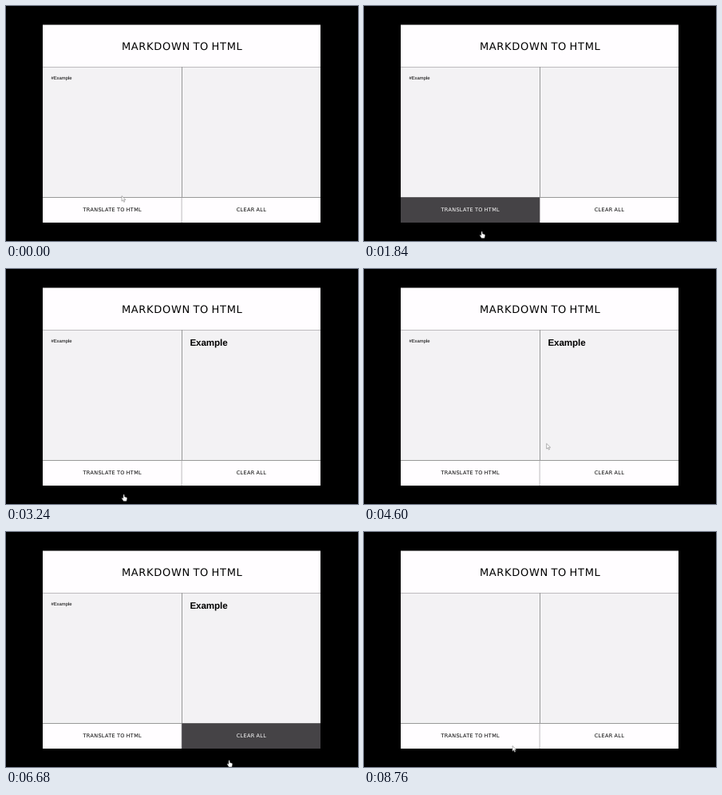
Animation of 441x294 px, one loop 9.44 s. Source, as an HTML page:

```html
<!DOCTYPE html>
<html lang="en">
<head>
<meta charset="utf-8">
<title>Markdown to HTML</title>
<style>
  html, body { margin: 0; width: 100%; height: 100%; overflow: hidden; background: #000; }
  svg { display: block; width: 441px; height: 294px; text-rendering: geometricPrecision; }
  .wide { font-family: "DejaVu Sans", sans-serif; text-anchor: middle; }
  .title { font-size: 13px; letter-spacing: .68px; word-spacing: -1.2px; }
  .label { font-size: 6.5px; letter-spacing: .34px; word-spacing: -.5px; }
  .plain { font-family: "Liberation Sans", Arial, sans-serif; }
</style>
</head>
<body>
<svg viewBox="0 0 441 294">
  <rect width="441" height="294"/>
  <rect x="46" y="23.5" width="348" height="247.5" fill="#fffdff"/>
  <rect x="46" y="76" width="348" height="163.5" fill="#f3f2f4"/>
  <rect x="46" y="76" width="348" height="1" fill="#bdbbbe"/>
  <rect x="46" y="239" width="348" height="1" fill="#999"/>
  <rect x="220" y="76" width="1" height="163" fill="#999"/>
  <rect x="219.6" y="240" width="1" height="31" fill="#bdbbbe"/>
  <text class="wide title" x="220.7" y="54.5">MARKDOWN TO HTML</text>
  <text class="plain" id="source" x="56.4" y="92" font-size="5.9">#Example</text>
  <text class="plain" id="result" x="230.4" y="96.4" font-size="11.6" letter-spacing="-.08" font-weight="bold">Example</text>
  <g id="translate">
    <rect x="46" y="239.4" width="174.2" height="31.6"/>
    <text class="wide label" x="133.3" y="257.4">TRANSLATE TO HTML</text>
  </g>
  <g id="clear">
    <rect x="220.2" y="239.4" width="173.8" height="31.6"/>
    <text class="wide label" x="307.4" y="257.4">CLEAR ALL</text>
  </g>
  <g id="cursor" stroke-linejoin="round">
    <path id="arrow" d="M0 0V6.6L1.6 5.2L2.7 7.7L3.8 7.2L2.7 4.8H4.9Z" fill="#fff" stroke="#808080" stroke-width=".6"/>
    <path id="hand" d="M0 .2Q.8 -.4 1.3 .4L1.6 3L4.2 3.8Q4.9 4.2 4.7 5.5L4 8.4H.2L-1.9 5.2Q-2.1 4.2 -1.2 4.3L-.2 5.1Z" fill="#fff" stroke="#333" stroke-width=".4"/>
  </g>
</svg>
<script>
const LOOP = 9440, STEP = 73, HOLD = 200;
const PRESS_TRANSLATE = 3040, PRESS_CLEAR = 7320;
const el = id => document.getElementById(id);
const clamp = v => Math.max(0, Math.min(1, v));
const show = (id, on) => el(id).setAttribute("visibility", on ? "visible" : "hidden");

// Resting places of the pointer tip
const home = { x: 145, y: 237.6 };
const belowTranslate = { x: 147, y: 282 };
const rightPane = { x: 228.7, y: 218.4 };
const overLine = { x: 259, y: 238.4 };
const belowClear = { x: 279, y: 285.5 };
const corner = { x: 186, y: 267.6 };

// A positive sag bends the path downwards
const toTranslate = { start: 840, end: 1680, from: home, to: belowTranslate, sag: 8, hover: true };
const toClear = { start: 5840, end: 6680, from: overLine, to: belowClear, sag: 8, hover: true };
const moves = [
  toTranslate,
  { start: 4160, end: 4600, from: belowTranslate, to: rightPane, sag: -28 },
  { start: 4880, end: 5760, from: rightPane, to: overLine, sag: 0 },
  toClear,
  { start: 8440, end: 8760, from: belowClear, to: corner, sag: 0 }
];

function progress(t, { start, end }) {
  if (t < start) return 0;
  const steps = Math.floor((end - start) / STEP) + 1;
  return clamp((Math.floor((t - start) / STEP) + 1) / steps);
}

function paintButton(id, t, approach, press) {
  const hover = t < press + HOLD ? clamp(2 * progress(t, approach) - 1) : 0;
  const [box, label] = el(id).children;
  box.setAttribute("fill", t < press ? "#454346" : "#231f23");
  box.setAttribute("fill-opacity", hover);
  const tone = Math.round(255 * hover);
  label.setAttribute("fill", `rgb(${tone},${tone},${tone})`);
}

function paintCursor(t) {
  const move = moves.findLast(m => t >= m.start) || moves[0];
  const { from, to, sag, hover } = move;
  const p = progress(t, move);
  const x = from.x + (to.x - from.x) * p;
  const y = from.y + (to.y - from.y) * p + sag * Math.sin(Math.PI * p);
  const pointing = Boolean(hover) && p >= .5;
  el("cursor").setAttribute("transform", `translate(${x} ${y})`);
  show("hand", pointing);
  show("arrow", !pointing);
}

function draw(t) {
  show("source", t < PRESS_CLEAR);
  show("result", t >= PRESS_TRANSLATE && t < PRESS_CLEAR);
  paintButton("translate", t, toTranslate, PRESS_TRANSLATE);
  paintButton("clear", t, toClear, PRESS_CLEAR);
  paintCursor(t);
}

const began = performance.now();
function tick() {
  draw((performance.now() - began) % LOOP);
  requestAnimationFrame(tick);
}
tick();
</script>
</body>
</html>
```
